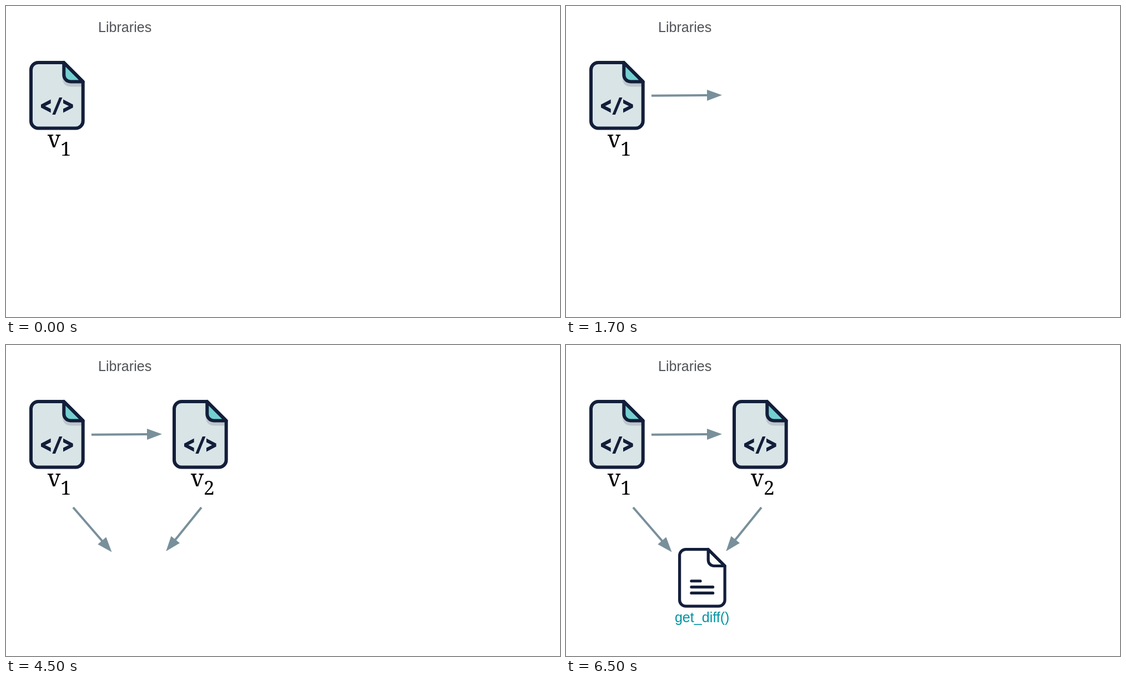
Recreate the animation shown at these times as an HTML page. Size 998 by 561 pixels, loop 8000 ms.

```html
<!DOCTYPE html>
<html lang="en">
<head>
<meta charset="utf-8">
<title>Library versions diff</title>
<style>
  html, body { margin: 0; width: 100%; height: 100%; overflow: hidden; background: #fff; }
  svg { display: block; width: 100%; height: 100%; }
  .sans { font: 25.1px "Liberation Sans", Arial, sans-serif; }
  .serif { font: 41px "Noto Serif", serif; }
  .sub { font-size: 35px; }
  .ink { fill: none; stroke: #131e3a; stroke-width: 6; stroke-linejoin: round; stroke-linecap: round; }
</style>
</head>
<body>
<svg viewBox="0 0 998 561">
  <defs>
    <path id="sheet" d="M16 3H62L96.700 37.700V108.500A13 13 0 0 1 83.700 121.500H16A13 13 0 0 1 3 108.500V16A13 13 0 0 1 16 3Z"/>
    <path id="fold" d="M62.300 3V25.500A12 12 0 0 0 74.300 37.500H96.700Z"/>
    <g id="code">
      <use href="#sheet" fill="#d9e4e7"/>
      <path d="M59.500 30Q60 46.500 76 46.500H95V36H62Z" fill="#bcc6cb"/>
      <use href="#fold" fill="#74d0d0"/>
      <use href="#sheet" class="ink"/>
      <use href="#fold" class="ink"/>
      <path d="M38.700 69.600V76.600L28.500 81.500L38.700 86.400V93.400L21 84.300V78.700ZM54 66H59.500L46.800 97H41.300ZM61 69.600V76.600L71.200 81.500L61 86.400V93.400L78.700 84.300V78.700Z" fill="#131e3a"/>
    </g>
  </defs>
  <text class="sans" x="166" y="47" fill="#505357">Libraries</text>
  <g id="stage"></g>
</svg>
<script>
const LOOP = 8000;
const stage = document.getElementById("stage");

const version = (n, x) => `
  <use href="#code" x="${x}" y="99"/>
  <text class="serif" x="${x + 32.8}" y="255">v</text>
  <text class="serif sub" x="${x + 56}" y="270">${n}</text>`;

function arrow(x1, y1, x2, y2) {
  const angle = Math.atan2(y2 - y1, x2 - x1) * 180 / Math.PI;
  const length = Math.hypot(x2 - x1, y2 - y1), neck = length - 27;
  return `<path transform="translate(${x1} ${y1}) rotate(${angle})" fill="#78909b"
    d="M0 -2H${neck}V-10L${length} 0L${neck} 10V2H0Z"/>`;
}

const report = `
  <g transform="translate(202 366) scale(.87 .866)" class="ink">
    <use href="#sheet"/><use href="#fold"/>
    <path d="M27.500 69H46M27.500 81.500H72M27.500 94H72"/>
  </g>
  <text class="sans" x="195.900" y="500" fill="#0095a3">get_diff()</text>`;

// Each step appears at its time and stays until the loop restarts.
const steps = [
  [0, version(1, 42)],
  [500, arrow(154, 161.7, 281, 160.7)],
  [2500, version(2, 300)],
  [4500, arrow(121, 293, 190.5, 373.5) + arrow(352, 293, 288.3, 372)],
  [6500, report],
];
stage.innerHTML = steps.map(([, markup]) => `<g>${markup}</g>`).join("");

const start = performance.now();
function draw(now) {
  const t = Math.max(0, now - start) % LOOP;
  steps.forEach(([time], i) => {
    stage.children[i].style.display = t >= time ? "" : "none";
  });
  requestAnimationFrame(draw);
}
draw(start);
</script>
</body>
</html>
```
